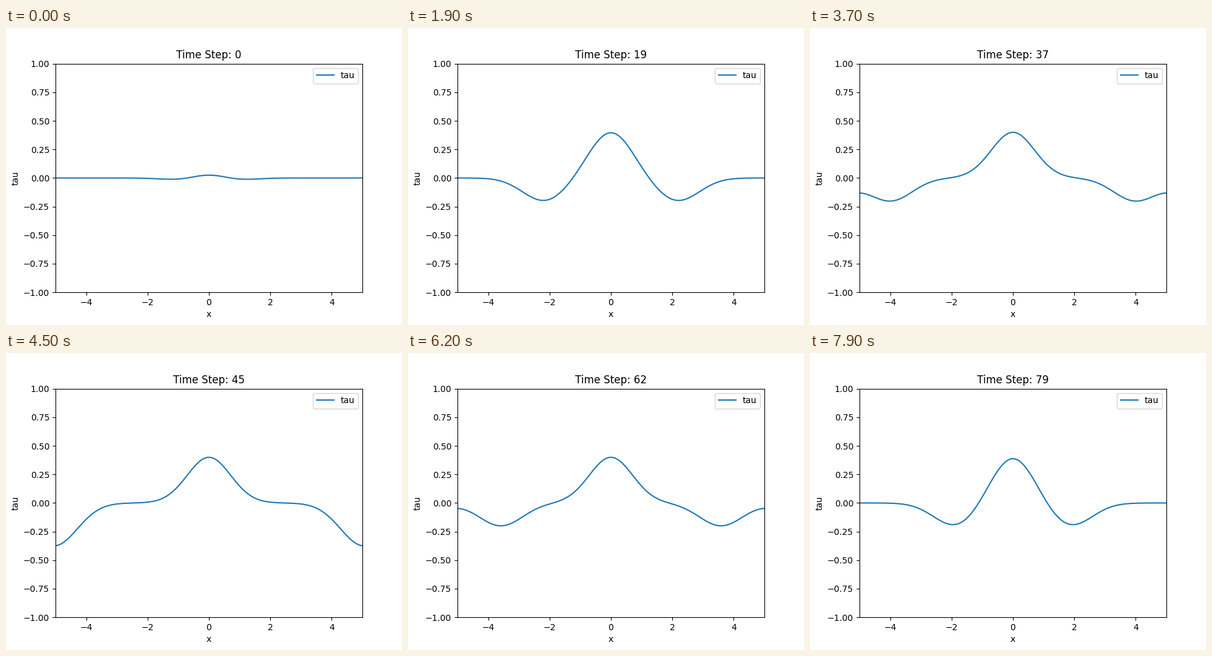
These frames come from a looping animation (640x480 px, 8000 ms). A matplotlib script:

```python
import numpy as np
import matplotlib.pyplot as plt
from matplotlib.animation import FuncAnimation

N = 100
STEPS = 80
AMP = 0.4

x = np.linspace(-5, 5, N)
dx = x[1] - x[0]
period = N * dx


def pulse(center):
    """Gaussian bump on the periodic domain."""
    return sum(np.exp(-(x - center + k * period) ** 2) for k in range(-2, 3))


def tau(step):
    # standing bump minus two half-height waves moving one cell per step
    d = (step + 2.5) * dx
    return AMP * (pulse(0) - 0.5 * (pulse(d) + pulse(-d)))


plt.rcParams["font.family"] = "DejaVu Sans"
fig, ax = plt.subplots(figsize=(6.4, 4.8), dpi=100)
line, = ax.plot(x, tau(0), label="tau")
ax.set(xlim=(-5, 5), ylim=(-1, 1), xlabel="x", ylabel="tau")
title = ax.set_title("Time Step: 0")
ax.legend(loc="upper right")


def update(step):
    line.set_ydata(tau(step))
    title.set_text(f"Time Step: {step}")
    return line, title


anim = FuncAnimation(fig, update, frames=STEPS, interval=100,
                     repeat=True, repeat_delay=0, blit=False)
plt.show()
```
